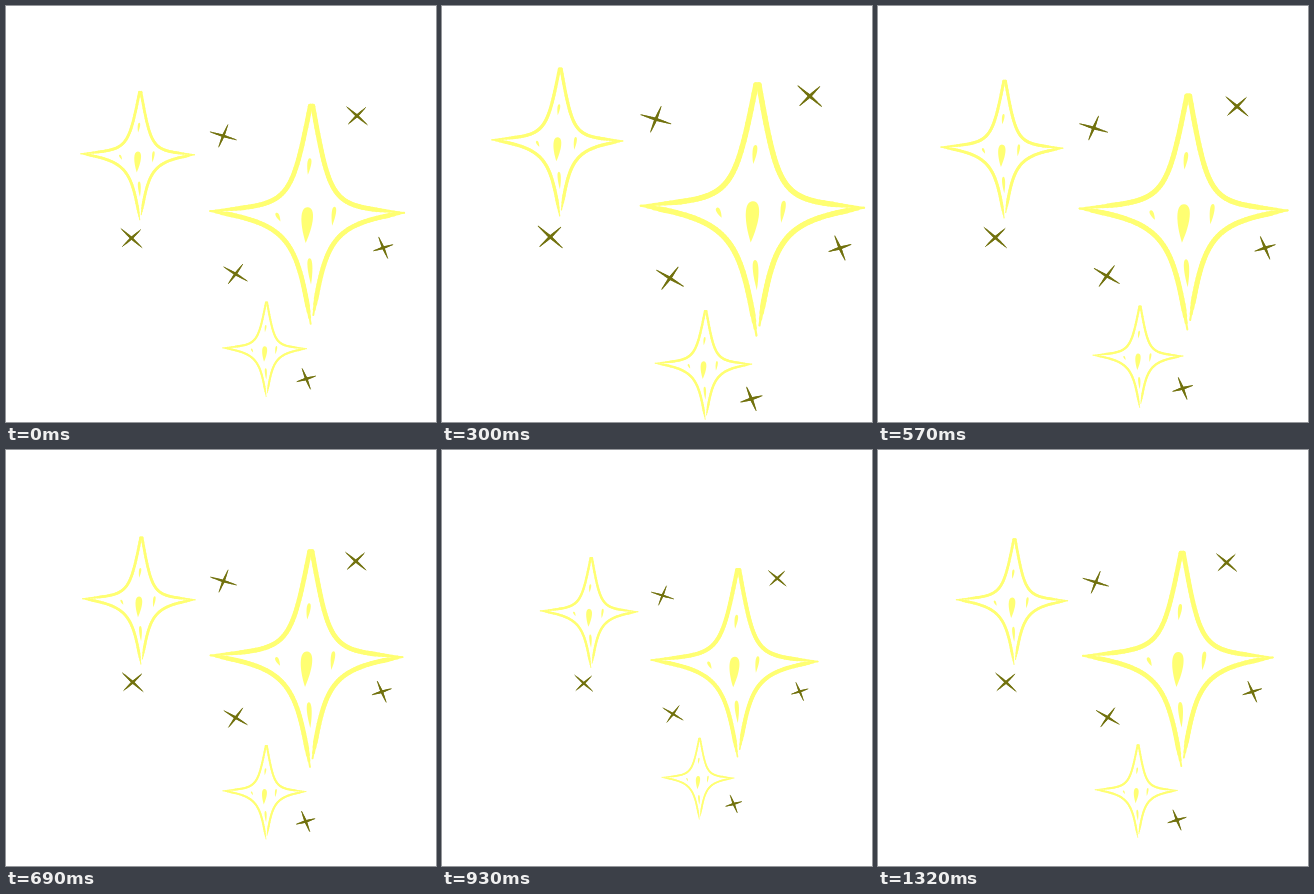
Write an HTML page with a canvas that moves like this. It is 430 px wide and 416 px high and loops after 1350 ms.

```html
<!DOCTYPE html>
<html>
<head>
<meta charset="utf-8">
<style>
html, body { margin: 0; width: 100%; height: 100%; overflow: hidden; background: #fff; }
canvas { display: block; }
</style>
</head>
<body>
<canvas id="stage" width="430" height="416"></canvas>
<script>
const ctx = document.getElementById('stage').getContext('2d');
const YELLOW = '#ffff72', OLIVE = '#72720f';
const LOOP = 1350, STEP = 30, CENTER = 240;

// All stars share one shape, placed at three sizes.
const stars = [
  { x: 315, y: 201, size: 1 },
  { x: 119, y: 135, size: 0.586 },
  { x: 263.5, y: 357, size: 0.432 }
];

const crosses = [
  { x: 367, y: 91, angle: 41, length: 31 },
  { x: 214, y: 114, angle: 17, length: 31 },
  { x: 109, y: 231, angle: 42, length: 32 },
  { x: 228, y: 272, angle: 31, length: 31 },
  { x: 397, y: 242, angle: 67, length: 26 },
  { x: 309, y: 392, angle: 68, length: 25 }
];

const tips = { left: [-116, -1], right: [106, 1], top: [0, -121], bottom: [-1, 128] };

// Curve from a side tip to an upper or lower tip; handles are fractions of that span.
function arc([x0, y0], [x1, y1], handle1, handle2, steps = 40) {
  const along = (t, h1, h2) => 3 * t * (1 - t) ** 2 * h1 + 3 * t * t * (1 - t) * h2 + t ** 3;
  return Array.from({ length: steps + 1 }, (_, i) => [
    x0 + (x1 - x0) * along(i / steps, handle1[0], handle2[0]),
    y0 + (y1 - y0) * along(i / steps, handle1[1], handle2[1])
  ]);
}

const upper = (side, tip) => arc(side, tip, [0.78, 0.07], [0.8, 0.04]);
const lower = (side, tip) => arc(side, tip, [0.78, 0.11], [0.86, 0.25]);
const beside = ([x, y], dx, dy = 0) => [x + dx, y + dy];

const outline = [
  [...upper(tips.left, beside(tips.top, -1.5)), ...upper(tips.right, beside(tips.top, 1.5)).reverse()],
  lower(tips.left, tips.bottom),
  lower(tips.right, beside(tips.bottom, 3, -10))
];

function brush(path, width, taper) {
  const last = path.length - 1;
  for (let i = 0; i < last; i++) {
    const edge = Math.min(i + 0.5, last - i - 0.5) / last;
    ctx.lineWidth = width * (0.3 + 0.7 * Math.min(1, edge / taper));
    ctx.beginPath();
    ctx.moveTo(...path[i]);
    ctx.lineTo(...path[i + 1]);
    ctx.stroke();
  }
}

function place(x, y, angle, scale, paint) {
  ctx.save();
  ctx.translate(x, y);
  ctx.rotate(angle);
  ctx.scale(scale, scale);
  paint();
  ctx.restore();
}

function drop(x, y, w, h, tilt) {
  place(x, y, tilt, 1, () => {
    ctx.beginPath();
    ctx.moveTo(0, -h / 2);
    ctx.bezierCurveTo(w * 0.75, -h / 2, w * 0.6, 0, 0, h / 2);
    ctx.bezierCurveTo(-w * 0.6, 0, -w * 0.75, -h / 2, 0, -h / 2);
    ctx.fill();
  });
}

function drawStar() {
  for (const path of outline) brush(path, 5.4, 0.08);
  drop(-5.5, 15, 13, 41, 0.06);
  drop(-3, -52, 4.5, 19, 0.13);
  drop(25, 5, 4.8, 22, 0.13);
  drop(-38, 6, 4, 11, -0.45);
  drop(-1.5, 68, 5.5, 30, -0.06);
}

function flick(angle, length) {
  const dx = Math.cos(angle) * length / 2, dy = Math.sin(angle) * length / 2;
  brush(arc([-dx, -dy], [dx, dy], [1 / 3, 1 / 3], [2 / 3, 2 / 3], 16), 2.8, 0.45);
}

function drawCross(length) {
  flick(0, length);
  flick(Math.PI * 0.53, length * 0.88);
}

function draw(time) {
  const t = Math.floor((time % LOOP) / STEP) * STEP;
  const scale = 0.874 + 0.134 * Math.sin(2 * Math.PI * t / LOOP);

  ctx.fillStyle = '#fff';
  ctx.fillRect(0, 0, 430, 416);
  ctx.lineCap = 'round';

  place(CENTER, CENTER, 0, scale, () => {
    ctx.translate(-CENTER, -CENTER);
    ctx.strokeStyle = ctx.fillStyle = YELLOW;
    for (const { x, y, size } of stars) place(x, y, 0, size, drawStar);
    ctx.strokeStyle = OLIVE;
    for (const { x, y, angle, length } of crosses) {
      place(x, y, angle * Math.PI / 180, 1, () => drawCross(length));
    }
  });
}

const start = performance.now();
function frame() {
  draw(performance.now() - start);
  requestAnimationFrame(frame);
}
frame();
</script>
</body>
</html>
```
